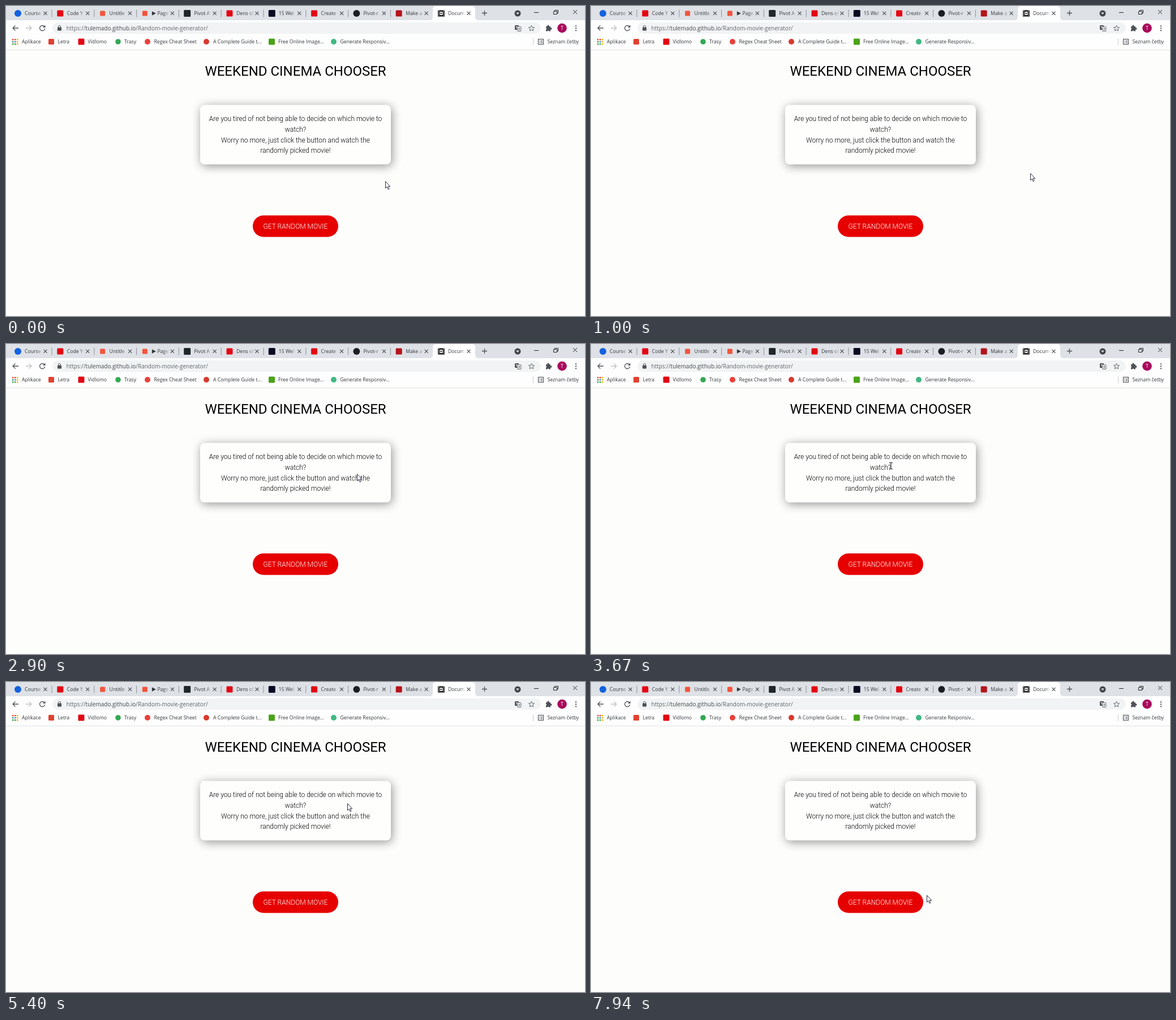
These frames come from a looping animation (1023x547 px, 8000 ms). An HTML page:

```html
<!DOCTYPE html>
<html lang="en">
<head>
<meta charset="utf-8">
<title>Page</title>
<style>
  html, body { margin: 0; width: 100%; height: 100%; overflow: hidden; background: #fdfdfc; }
  svg { display: block; width: 100%; height: 100%; }
  .ui { font: 8.7px "Open Sans", "Noto Sans", sans-serif; fill: #34373b; }
  .url { font-size: 10px; fill: #63676c; }
  .page { font: 300 12px Roboto, sans-serif; text-anchor: middle; fill: #000; }
  .line { fill: none; stroke: #4e5257; stroke-width: 1.3; }
  .ink { fill: #4e5257; }
</style>
</head>
<body>
<svg viewBox="0 0 1023 547">
  <defs>
    <linearGradient id="fade">
      <stop offset="0" stop-color="#dee1e6" stop-opacity="0"/>
      <stop offset="1" stop-color="#dee1e6"/>
    </linearGradient>
    <linearGradient id="fadeActive">
      <stop offset="0" stop-color="#fff" stop-opacity="0"/>
      <stop offset="1" stop-color="#fff"/>
    </linearGradient>
    <filter id="blur" x="-20%" y="-40%" width="140%" height="180%">
      <feGaussianBlur stdDeviation="8.5"/>
    </filter>
  </defs>

  <!-- browser frame -->
  <rect width="1023" height="25" fill="#dee1e6"/>
  <rect y="25" width="1023" height="52" fill="#fefefe"/>
  <path d="M0 77.5H1023" stroke="#e1e2e4"/>
  <path d="M748 25Q754 25 754 19V6Q754 0 760 0H823Q829 0 829 6V19Q829 25 835 25Z" fill="#fff"/>
  <g id="tabs" class="ui"></g>

  <!-- window controls -->
  <path class="line" d="M841 12.5H850M845.500 8V17"/>
  <circle cx="904" cy="13" r="5.500" fill="#42464b"/>
  <path d="M901 11.500H907L904 15Z" fill="#dee1e6"/>
  <path d="M933 11.500H941M967.500 9.500H973.500V14.500H967.500ZM969.500 9V7.500H975.500V12.500H974M1002 7L1009 14M1009 7L1002 14" fill="none" stroke="#222"/>

  <!-- toolbar -->
  <rect x="82" y="29" width="863" height="20" rx="10" fill="#f1f3f4"/>
  <path class="line" d="M22 39H12M16.500 34.500L12 39L16.500 43.500"/>
  <path class="line" style="stroke:#bfc1c4" d="M35 39H45M40.500 34.500L45 39L40.500 43.500"/>
  <path class="line" d="M68 36.500A4.600 4.600 0 1 0 68.700 40"/>
  <path class="ink" d="M69.500 33.500V38H65Z"/>
  <rect class="ink" x="91" y="37.500" width="7" height="6" rx=".8"/>
  <path class="line" style="stroke-width:1" d="M92.500 38V36.500A2 2 0 0 1 96.500 36.500V38"/>
  <text class="ui url" x="106.500" y="42.700">https://<tspan fill="#44484d">tulemado.github.io</tspan>/Random-movie-generator/</text>
  <rect class="ink" x="899" y="34" width="7" height="8" rx="1"/>
  <rect x="903.500" y="36.500" width="6.500" height="8" rx="1" fill="#f1f3f4" stroke="#5f6368" stroke-width=".9"/>
  <path d="M905 39.500H908.700M906.800 38.500V39.500M908 39.500Q907.500 42 905 43M905.700 40.500L908.500 43" fill="none" stroke="#5f6368" stroke-width=".7"/>
  <path d="M900.800 36.500H904M902.400 36.500V40" stroke="#fff" stroke-width=".8"/>
  <path id="star" fill="none" stroke="#5f6368"/>
  <path class="ink" d="M954 36H956.500A1.700 1.700 0 1 1 959.500 36H962V38.500A1.700 1.700 0 1 1 962 41.500V44.500H959.500A1.600 1.600 0 0 0 956.500 44.500H954V41.500A1.600 1.600 0 0 0 954 38.500Z"/>
  <circle cx="982.500" cy="39" r="8.300" fill="#a8085c"/>
  <text class="ui" x="982.500" y="42.300" text-anchor="middle" style="fill:#fff">T</text>
  <path d="M1007 34.200V36.200M1007 38.200V40.200M1007 42.200V44.200" stroke="#4e5257" stroke-width="2"/>

  <!-- bookmarks -->
  <g id="marks" class="ui"></g>
  <path d="M931.500 57V69" stroke="#c9ccd0"/>
  <rect class="line" x="940.500" y="58.500" width="9" height="9" style="stroke-width:1.100"/>
  <path class="line" d="M942 61H943.200M944.500 61H948M942 63H943.200M944.500 63H948M942 65H943.200M944.500 65H948" style="stroke-width:.9"/>
  <text class="ui" x="956.500" y="66.200">Seznam četby</text>

  <!-- page -->
  <text class="page" x="511.500" y="122.700" style="font-size:24px;font-weight:400">WEEKEND CINEMA CHOOSER</text>
  <rect x="345" y="177.500" width="337" height="105" rx="8" fill="#000" opacity=".42" filter="url(#blur)"/>
  <rect x="343" y="174.500" width="337" height="105" rx="8" fill="#fefefd"/>
  <g id="copy" class="page"></g>
  <rect x="436" y="369.500" width="151" height="38" rx="19" fill="#e60000"/>
  <text class="page" x="511.500" y="393" style="fill:#fff">GET RANDOM MOVIE</text>

  <!-- pointers, hot spot at 0,0 -->
  <g id="pointer">
    <path id="arrow" d="M.5 .5V12.500L3.200 10L5.100 14.500L7 13.700L5.100 9.300H8.700Z" fill="#fff" stroke="#15152a" stroke-width=".9"/>
    <path id="beam" d="M-3 -5.500H-1L0 -5L1 -5.500H3M0 -5V5M-3 5.500H-1L0 5L1 5.500H3" fill="none" stroke="#111"/>
    <path id="hand" d="M-1 1Q0 -.7 1 1V5.500L5.500 6.500Q7 7 7 8.500V11L5.500 15.500H-1L-4.500 10Q-5 8.500 -3 8.500L-1 10Z" fill="#fff" stroke="#111" stroke-width=".9"/>
  </g>
</svg>
<script>
const $ = id => document.getElementById(id);

function add(parent, tag, attrs, text = "") {
  const el = document.createElementNS("http://www.w3.org/2000/svg", tag);
  for (const k in attrs) el.setAttribute(k, attrs[k]);
  el.textContent = text;
  parent.append(el);
  return el;
}

const dot = (g, cx, cy, r, fill) => add(g, "circle", { cx, cy, r, fill });
const box = (g, cx, cy, s, fill) =>
  add(g, "rect", { x: cx - s / 2, y: cy - s / 2, width: s, height: s, rx: 1.5, fill });

// tabs: label, icon shape, icon size, icon colour
const tabs = [
  ["Course", dot, 6, "#1262e0"], ["Code Y", box, 11, "#e30613"],
  ["Untitle", box, 9, "#f2553d"], ["Page", box, 9, "#f2553d"],
  ["Pivot A", box, 12, "#20272b"], ["Dens of", box, 11, "#e30613"],
  ["15 Wel", box, 12, "#0a0a23"], ["Create", box, 11, "#e30613"],
  ["Pivot-r", dot, 6, "#1b1f23"], ["Make a", box, 11, "#b5141b"],
  ["Docum", null]
];
tabs.forEach(([label, shape, size, fill], i) => {
  const g = $("tabs"), x = 21 + 74.8 * i, last = i === tabs.length - 1;
  if (shape) shape(g, x, 13, size, fill);
  else {
    add(g, "path", { d: `M${x - 6} 7.500h12v11h-12z`, fill: "#161616" });
    add(g, "path", { d: `M${x - 4.500} 8v10M${x + 4.500} 8v10`, stroke: "#fff", "stroke-width": 1.3, "stroke-dasharray": "1.300 1.200" });
    add(g, "path", { d: `M${x - 2.500} 10h5v6h-5z`, fill: "#fff" });
    add(g, "path", { d: `M${x - 1.200} 11.300l3 1.700l-3 1.700z`, fill: "#161616" });
  }
  const play = i === 3;
  if (play) add(g, "path", { d: `M${x + 12.500} 9.300l7 3.700l-7 3.700z`, fill: "#34373b" });
  add(g, "text", { x: x + (play ? 22 : 12), y: 16.2 }, label);
  add(g, "rect", { x: x + 33, y: 5, width: 11, height: 16, fill: last ? "url(#fadeActive)" : "url(#fade)" });
  add(g, "path", { d: `M${x + 45.500} 9.800l6 6m0 -6l-6 6`, stroke: "#4a4e53", "stroke-width": 1.2 });
  if (i < 9) add(g, "path", { d: `M${x + 60} 6.500v13`, stroke: "#8d9197" });
});

// bookmarks: icon x, shape, size, colour, label x, label
const marks = [
  [80, box, 10, "#e0412f", 91.5, "Letra"],
  [133, box, 11, "#e30613", 144.5, "Vidlomo"],
  [198, dot, 4.8, "#34a853", 209, "Trasy"],
  [250, dot, 5, "#e8403c", 261.5, "Regex Cheat Sheet"],
  [354, dot, 5, "#d83a2e", 366, "A Complete Guide t..."],
  [469.5, box, 11, "#4aa318", 481, "Free Online Image..."],
  [579, dot, 5, "#41b883", 590.5, "Generate Responsiv..."]
];
const gridInk = ["#e54335", "#e54335", "#f5b400", "#34a050", "#4285f4", "#f5b400", "#34a050", "#34a050", "#f5b400"];
gridInk.forEach((c, i) => add($("marks"), "rect",
  { x: 11 + i % 3 * 4, y: 58 + Math.floor(i / 3) * 4, width: 2.5, height: 2.5, fill: c }));
add($("marks"), "text", { x: 28, y: 66.2 }, "Aplikace");
for (const [x, shape, size, fill, tx, label] of marks) {
  shape($("marks"), x, 63, size, fill);
  add($("marks"), "text", { x: tx, y: 66.2 }, label);
}

$("star").setAttribute("d", "M" + Array.from({ length: 10 }, (_, i) => {
  const a = i * Math.PI / 5, r = i % 2 ? 2.4 : 5.3;
  return `${928.5 + r * Math.sin(a)} ${39.5 - r * Math.cos(a)}`;
}).join("L") + "Z");

const copy = [
  "Are you tired of not being able to decide on which movie to", "watch?",
  "Worry no more, just click the button and watch the", "randomly picked movie!"
];
copy.forEach((s, i) => add($("copy"), "text", { x: 511.5, y: 202.7 + 18.9 * i }, s));

// pointer path: time, x, y
const path = [
  [0, 670, 309], [400, 716, 311], [830, 767, 299], [1000, 776, 295],
  [1400, 781, 288], [1670, 781, 288], [1970, 748, 261], [2470, 680, 241],
  [2900, 620, 229], [3300, 573, 221], [3900, 512, 213], [4470, 494, 211],
  [4800, 530, 210], [5040, 566, 210], [5400, 603, 214], [5840, 645, 226],
  [6040, 653, 240], [6300, 624, 300], [6670, 555, 363], [7000, 547, 379],
  [7400, 546, 384], [7600, 546, 384], [7690, 541, 387], [7940, 593, 376]
];
const slope = (i, c) => (path[i + 1][c] - path[i][c]) / (path[i + 1][0] - path[i][0]);
function tangent(i, c) {
  if (i === 0) return slope(0, c);
  if (i === path.length - 1) return slope(i - 1, c);
  const a = slope(i - 1, c), b = slope(i, c);
  return a * b > 0 ? 2 * a * b / (a + b) : 0;
}

// monotone cubic between the path points
function at(t, c) {
  const i = path.findIndex(p => p[0] > t) - 1;
  if (i < 0) return path[path.length - 1][c];
  const h = path[i + 1][0] - path[i][0], u = (t - path[i][0]) / h, v = 1 - u;
  return path[i][c] * (1 + 2 * u) * v * v + path[i + 1][c] * u * u * (3 - 2 * u)
    + h * u * v * (tangent(i, c) * v - tangent(i + 1, c) * u);
}

const textHalf = [152.5, 19, 131.5, 62.5];
function kind(x, y) {
  if (x > 436 && x < 587 && y > 370 && y < 407) return "hand";
  const row = Math.floor((y - 192) / 19), inRow = (y - 192) % 19 <= 14;
  return inRow && Math.abs(x - 511.5) < textHalf[row] ? "beam" : "arrow";
}

const start = performance.now();
function draw() {
  const t = (performance.now() - start) % 8000;
  const x = Math.round(at(t, 1)), y = Math.round(at(t, 2)), shown = kind(x, y);
  $("pointer").setAttribute("transform", `translate(${x} ${y})`);
  for (const id of ["arrow", "beam", "hand"]) $(id).style.display = id === shown ? "" : "none";
  requestAnimationFrame(draw);
}
draw();
</script>
</body>
</html>
```
